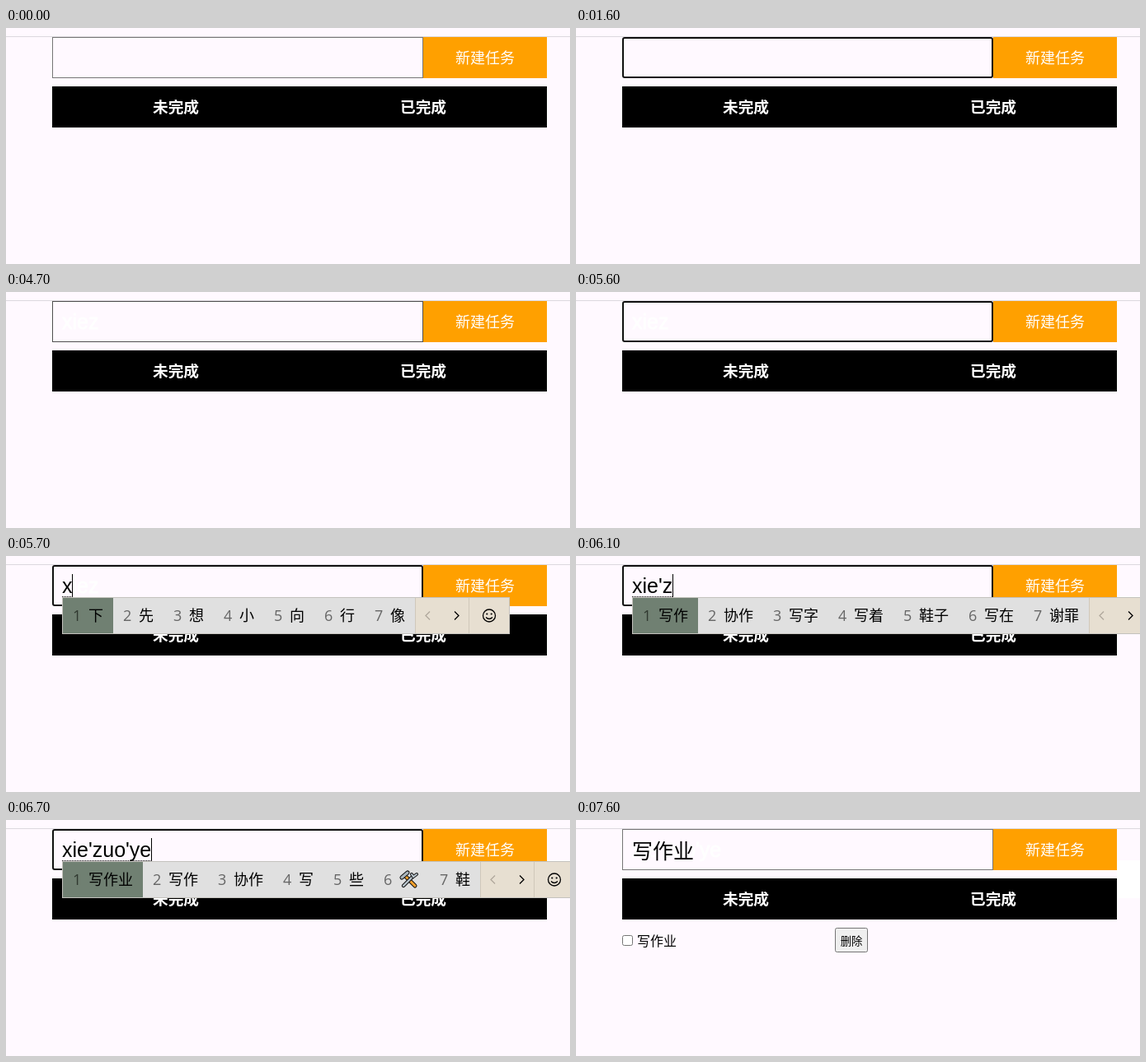
An HTML page that plays this animation: 684 px wide and 287 px high, repeating every 8000 ms.

```html
<!DOCTYPE html>
<html lang="zh-CN">
<head>
<meta charset="utf-8">
<title>任务列表</title>
<style>
  html, body { margin: 0; height: 100%; overflow: hidden; background: #fff9ff; }
  svg { display: block; font-family: "Noto Sans CJK SC", "Noto Sans CJK", sans-serif; }
  .mid { text-anchor: middle; }
  .title { font-size: 18.72px; font-weight: 700; fill: #fff; }
  .entry { font: 25px "Liberation Sans", "Noto Sans CJK SC", "Noto Sans CJK", sans-serif; }
  .digit { font: 18px "Open Sans", "Noto Sans", sans-serif; fill: #666; }
  .line { fill: none; stroke: #000; stroke-width: 1.3; }
</style>
</head>
<body>
<svg width="684" height="287" viewBox="0 0 684 287">
  <rect y="10" width="684" height="1" fill="#dcd8de"/>
  <rect id="trail" x="656" y="49" width="28" height="46" fill="#fff"/>
  <rect x="506" y="11" width="150" height="50" fill="#ffa000"/>
  <text class="mid" x="581" y="43" font-size="18" fill="#fff">新建任务</text>
  <rect x="56" y="71" width="600" height="50"/>
  <text class="mid title" x="206" y="103">未完成</text>
  <text class="mid title" x="506" y="103">已完成</text>
  <rect id="field" fill="none"/>
  <text id="ghost" class="entry" x="68" y="45" fill="#fff" stroke="#fff" stroke-width=".8"></text>
  <text id="entry" class="entry" x="68"></text>
  <path id="under" stroke="#000" stroke-dasharray="1 1"/>
  <rect id="caret" width="1" height="28"/>
  <g id="task">
    <rect x="56.5" y="140.5" width="12" height="12" rx="2" fill="#fff" stroke="#767676"/>
    <text x="74" y="153" font-size="16">写作业</text>
    <rect x="314.5" y="131.5" width="39" height="29" rx="2" fill="#efefef" stroke="#767676"/>
    <text class="mid" x="334" y="152" font-size="13.33">删除</text>
  </g>
  <g id="popup"></g>
</svg>
<script>
const $ = id => document.getElementById(id);
const LOOP = 8000, LEFT = 68, TOOLS = '🛠';

const words = {
  "x": '下 先 想 小 向 行 像',
  "xi": '系 洗 西 戏 细 吸 喜',
  "xie": '写 些 🛠 鞋 谢 斜 协',
  "xie'z": '写作 协作 写字 写着 鞋子 写在 谢罪',
  "xie'zu": '写作 协作 鞋子 写 些 🛠 鞋',
  "xie'zuo": '写作 协作 写 些 🛠 鞋 谢',
  "xie'zuo'y": '写作业 写作 协作 写 些 🛠 鞋',
  "xie'zuo'ye": '写作业 写作 协作 写 些 🛠 鞋'
};

// [start ms, field state, text, caret shown, candidates shown]
const steps = [
  [0, 'idle', ''], [700, 'hover', ''], [1100, 'focus', '', 1], [1600, 'focus', ''],
  [1700, 'focus', 'x', 1], [1800, 'focus', 'xi', 1], [1900, 'focus', 'xie', 1],
  [2200, 'focus', 'xiez', 1], [2700, 'focus', 'xiez'], [3000, 'focus', 'xiez', 1],
  [3100, 'focus', 'xie', 1], [3200, 'focus', 'xi', 1], [3300, 'focus', 'x', 1],
  [3400, 'focus', '', 1], [3600, 'focus', ''], [4100, 'focus', '', 1],
  [4500, 'idle', ''], [4700, 'hover', ''], [5100, 'focus', '', 1], [5600, 'focus', ''],
  [5700, 'focus', "x", 1, 1], [5800, 'focus', "xi", 1, 1], [5900, 'focus', "xie", 1, 1],
  [6100, 'focus', "xie'z", 1, 1], [6300, 'focus', "xie'zu", 1, 1],
  [6400, 'focus', "xie'zuo", 1, 1], [6500, 'focus', "xie'zuo'y", 1, 1],
  [6600, 'focus', "xie'zuo'ye", 1, 1], [6800, 'focus', '写作业', 1],
  [7200, 'focus', '写作业'], [7600, 'idle', '写作业']
];

function set(id, attrs) {
  for (const name in attrs) $(id).setAttribute(name, attrs[name]);
}
const show = (id, on) => set(id, { visibility: on ? 'visible' : 'hidden' });
const box = (x, w, fill) => `<rect x="${x}" y="51" width="${w}" height="43" fill="${fill}"/>`;

// Crossed hammer and wrench
function tools(x) {
  const bar = (d, color, w) =>
    `<path d="${d}" fill="none" stroke="#111" stroke-width="${w + 2}"/>` +
    `<path d="${d}" fill="none" stroke="${color}" stroke-width="${w}"/>`;
  return `<g transform="translate(${x} 62)" stroke-linecap="round">` +
    bar('M6 6L18 18', '#f5a12c', 3) + bar('M4 18L15 7', '#b8c4cc', 2.4) +
    bar('M20 4L16 7L14 4', '#b8c4cc', 2) + bar('M2 8L9 2', '#aab5bc', 3) + '</g>';
}

function popup(list) {
  let x = LEFT, cells = '';
  list.split(' ').forEach((word, i) => {
    const emoji = word === TOOLS;
    const w = 43 + (emoji ? 25 : 18 * word.length);
    if (!i) cells += box(x + 1, w, '#708072');
    cells += `<text class="digit" x="${x + 13}" y="79"${i ? '' : ' style="fill:#303830"'}>${i + 1}</text>`;
    cells += emoji ? tools(x + 33) : `<text x="${x + 32}" y="79" font-size="18">${word}</text>`;
    x += w;
  });
  x++;
  return `<rect x="68.5" y="50.5" width="${x + 46}" height="44" fill="#e0e0e0" stroke="#c4c2bd"/>` +
    cells + box(x, 114, '#e7dfd1') + box(x, 1, '#d0c8ba') + box(x + 65, 1, '#d0c8ba') +
    `<path class="line" d="M${x + 18} 67.5l-5 5l5 5" style="stroke:#b0a89c"/>
     <path class="line" d="M${x + 48} 67.5l5 5l-5 5"/>
     <circle class="line" cx="${x + 90}" cy="72.5" r="7.5"/>
     <circle cx="${x + 87.3}" cy="70.5" r="1.1"/><circle cx="${x + 92.7}" cy="70.5" r="1.1"/>
     <path class="line" d="M${x + 86} 74.5q4 4 8 0"/>`;
}

function draw([time, state, text, caret, choosing]) {
  const focus = state === 'focus', han = text === '写作业';
  set('field', focus
    ? { x: 57, y: 12, width: 448, height: 48, rx: 2, stroke: '#101010', 'stroke-width': 2 }
    : { x: 56.5, y: 11.5, width: 449, height: 49, rx: 0, stroke: state === 'hover' ? '#4f4f4f' : '#767676', 'stroke-width': 1 });
  $('ghost').textContent = time < 3100 ? '' : time < 6500 ? 'xiez' : "xie'zuo'ye";
  $('entry').textContent = text;
  set('entry', { y: han ? 47 : 45 });
  const end = Math.floor(LEFT + (text ? $('entry').getComputedTextLength() : 0));
  set('caret', { x: end, y: han ? 23 : 22 });
  show('caret', caret);
  set('under', { d: `M${LEFT} 49.5H${end}` });
  show('under', choosing);
  show('trail', time >= 6100);
  show('task', time >= 7600);
  $('popup').innerHTML = choosing ? popup(words[text]) : '';
}

let current;
function tick() {
  const t = performance.now() % LOOP;
  const step = steps.findLast(s => s[0] <= t);
  if (step !== current) draw(current = step);
  requestAnimationFrame(tick);
}
tick();
</script>
</body>
</html>
```
